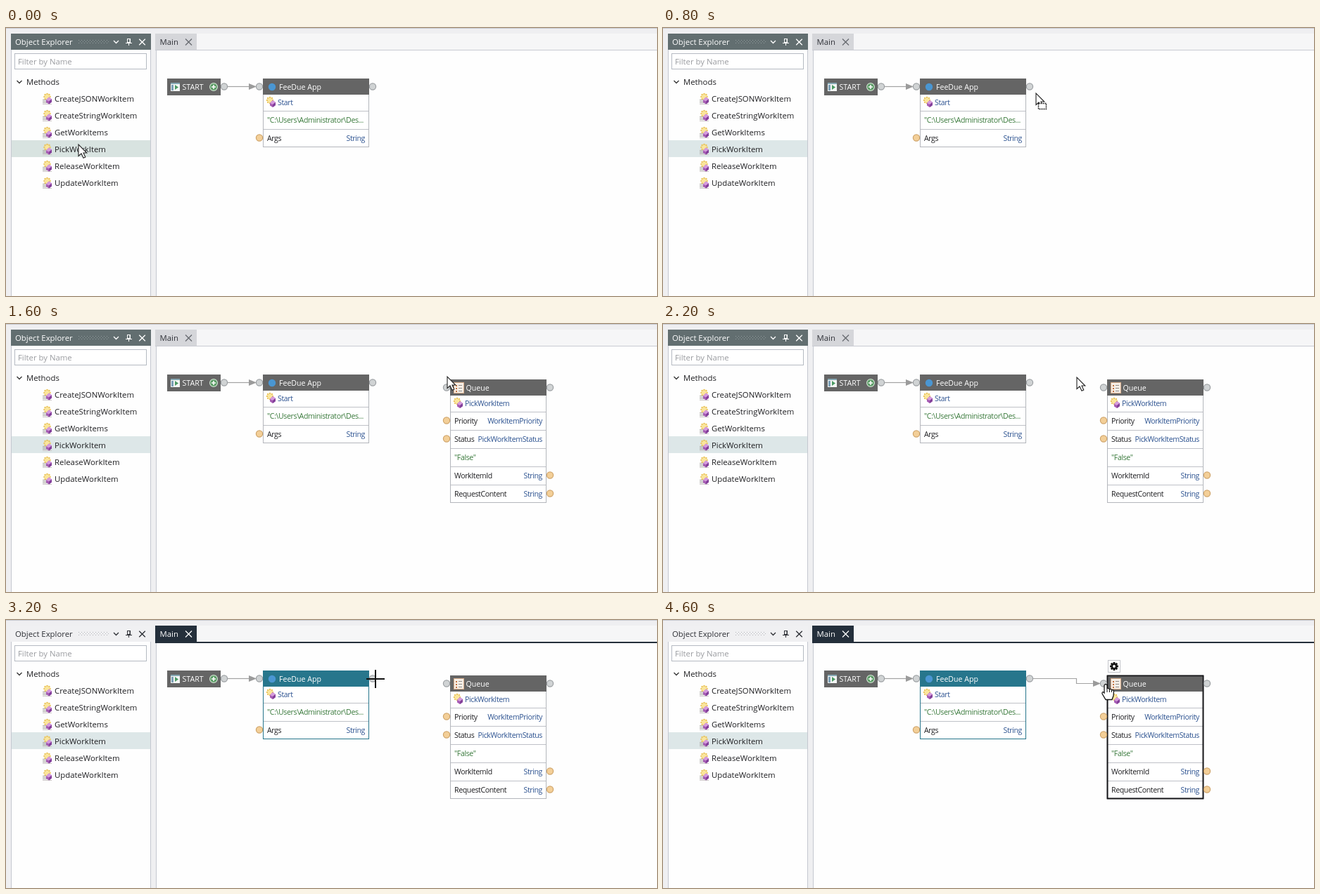
An HTML page with a canvas that plays this animation: 925 by 382 pixels, repeating every 4.8 s.

```html
<!DOCTYPE html>
<html lang="en">
<head>
<meta charset="utf-8">
<title>Workflow designer</title>
<style>
html, body { margin: 0; width: 100%; height: 100%; overflow: hidden; background: #efeff1; }
canvas { display: block; }
</style>
</head>
<body>
<canvas id="stage" width="925" height="382"></canvas>
<script>
const ctx = document.getElementById('stage').getContext('2d');
const LOOP = 4800, STEP = 200;
const FONT = '"Open Sans", "Noto Sans", sans-serif';
const BLUE = '#2c5290', GREEN = '#3a7a3c', INK = '#1f1f22', GREY = '#656565', TEAL = '#27768c';
const METHODS = ['CreateJSONWorkItem', 'CreateStringWorkItem', 'GetWorkItems',
  'PickWorkItem', 'ReleaseWorkItem', 'UpdateWorkItem'];

// Pointer path: time, x, y, shape
const POINTER = [
  [0, 103, 166, 'arrow'], [200, 128, 165, 'drag'], [400, 262, 148, 'drag'],
  [600, 415, 124, 'drag'], [800, 530, 93, 'drag'], [1000, 581, 86, 'drag'],
  [1200, 626, 76, 'drag'], [1400, 627, 75, 'arrow'], [2200, 588, 76, 'arrow'],
  [2600, 550, 77, 'arrow'], [2800, 525, 79, 'arrow'], [3000, 521, 80, 'hand'],
  [3200, 525, 84, 'cross'], [3400, 545, 86, 'cross'], [3600, 583, 90, 'cross'],
  [3800, 610, 90.5, 'cross'], [4000, 627, 91, 'cross'], [4200, 635, 92, 'cross'],
  [4400, 629, 91, 'hand']
];
const pointerAt = t => POINTER.filter(p => p[0] <= t).pop();

function rect(x, y, w, h, fill, stroke, lw = 1) {
  if (fill) { ctx.fillStyle = fill; ctx.fillRect(x, y, w, h); }
  if (stroke) {
    ctx.strokeStyle = stroke;
    ctx.lineWidth = lw;
    ctx.strokeRect(x + .5, y + .5, w - 1, h - 1);
  }
}

function path(pts, stroke, lw = 1, fill) {
  ctx.beginPath();
  pts.forEach(([x, y], i) => i ? ctx.lineTo(x, y) : ctx.moveTo(x, y));
  if (fill) { ctx.closePath(); ctx.fillStyle = fill; ctx.fill(); }
  if (stroke) { ctx.strokeStyle = stroke; ctx.lineWidth = lw; ctx.stroke(); }
}

function disc(x, y, r, fill, stroke, lw = 1) {
  ctx.beginPath();
  ctx.arc(x, y, r, 0, Math.PI * 2);
  ctx.fillStyle = fill;
  ctx.fill();
  if (stroke) { ctx.strokeStyle = stroke; ctx.lineWidth = lw; ctx.stroke(); }
}

function text(s, x, y, color = INK, size = 11.35, align = 'left', spacing = 0) {
  ctx.font = size + 'px ' + FONT;
  ctx.letterSpacing = spacing + 'px';
  ctx.textAlign = align;
  ctx.fillStyle = color;
  ctx.fillText(s, x, y);
}
const cell = (s, x, y, color, align) => text(s, x, y, color, 10.6, align, -.4);

function at(x, y, draw) {
  ctx.save();
  ctx.translate(x, y);
  draw();
  ctx.restore();
}

const port = (x, y) => disc(x, y, 4.6, '#d0d3d4', '#9b9fa2', 1.2);
const dataPort = (x, y) => disc(x, y, 4.6, '#f3cf98', '#cfa469', 1.2);

function cross(x, y, r, color, lw) {
  path([[x - r, y - r], [x + r, y + r]], color, lw);
  path([[x - r, y + r], [x + r, y - r]], color, lw);
}

function burst(x, y) {
  for (let i = 0; i < 8; i++) {
    const a = i * Math.PI / 4;
    disc(x + 4 * Math.cos(a), y + 4 * Math.sin(a), 1.3, '#ecc65c');
  }
  disc(x, y, 3, '#fbe69a');
}

function cube(x, y) {
  path([[x, y + 4], [x + 4, y], [x + 8, y + 3], [x + 8, y + 7], [x + 4, y + 10], [x, y + 7.5]],
    null, 1, '#a65cb4');
  path([[x, y + 4], [x + 4, y], [x + 8, y + 3], [x + 4, y + 6]], null, 1, '#d59bdc');
  path([[x + 4, y + 6], [x + 8, y + 3], [x + 8, y + 7], [x + 4, y + 10]], null, 1, '#83409a');
}

function treeIcon(x, y) {
  for (let i = 0; i < 3; i++) rect(x + 1, y + 9 + i * 2, 6, 1, '#a9a7a3');
  rect(x + 1, y + 15, 13, 1, '#c9c3c4');
  burst(x + 7.5, y + 5);
  cube(x + 6, y + 5.5);
}

function callIcon(x, y) {
  burst(x + 5, y + 5);
  cube(x + 5, y + 5);
}

function panel(t) {
  const active = t < 3200, ink = active ? '#fff' : '#2e3036';
  rect(7, 8, 199, 380, '#fefefe', '#c5c8d0');
  rect(7, 8, 199, 23, active ? '#626e70' : '#f0f0f2');
  text('Object Explorer', 13, 24, ink);
  ctx.fillStyle = active ? '#909a9b' : '#b3b5ba';
  for (let row = 0; row < 3; row++)
    for (let x = 103 + row % 2 * 2; x < 146; x += 4) ctx.fillRect(x, 17 + row * 2, 1, 1);
  path([[153, 18], [156.5, 21.5], [160, 18]], ink, 1.3);
  rect(172, 15, 5, 6, null, ink);
  path([[170, 21.5], [179, 21.5]], ink);
  path([[174.5, 21], [174.5, 25]], ink);
  path([[176, 15], [176, 21]], ink);
  cross(193.5, 20, 4.3, ink, 1.3);

  rect(12, 36, 188, 23, '#fff', '#b5bac2');
  text('Filter by Name', 17, 52, '#9a9ca0');
  path([[15.5, 75], [19, 78.5], [22.5, 75]], '#333', 1.3);
  text('Methods', 29, 81);
  rect(8, 160, 197, 24, t ? '#dde7e8' : '#d8e3e0');
  METHODS.forEach((name, i) => {
    treeIcon(51, 93 + i * 24);
    text(name, 69, 105 + i * 24);
  });
}

function workspace(t) {
  const active = t >= 3200, dark = '#242f3b';
  rect(213, 8, 712, 23, '#f6f6f7');
  rect(213, 31, 713, 360, '#fefefe');
  rect(213, 31, 1, 351, '#c5c8d0');
  rect(212, 8, 59, 24, active ? dark : '#d5d6da');
  rect(212, 31, 713, active ? 2 : 1, active ? dark : '#c9cbd2');
  text('Main', 218.5, 24, active ? '#fff' : '#303238');
  cross(259.5, 20, 4.5, active ? '#fff' : '#66696e', 1.2);
}

function arrow(x, y) {
  path([[x, y], [x - 11, y - 4.5], [x - 11, y + 4.5]], null, 1, '#9b9b9b');
}

function startNode() {
  path([[315, 83.5], [346, 83.5]], '#a2a2a2', 1.2);
  arrow(356, 83.5);
  rect(229, 72, 76, 24, GREY);
  rect(234, 78, 13, 12, '#f4f6f5');
  rect(234, 78, 13, 2, '#86a8b4');
  rect(235, 81, 3, 8, '#7b9fb6');
  path([[240, 81], [245, 84.5], [240, 88]], null, 1, '#4b9a63');
  text('START', 250.5, 88, '#fff', 10.6);
  disc(295, 84, 5.4, '#5c9c67', '#cfe3d0', 1.2);
  path([[292, 84], [298, 84]], '#fff', 1.5);
  path([[295, 81], [295, 87]], '#fff', 1.5);
  port(310, 83.5);
}

// Title bar, one short row, then full rows
function node(x, y, w, rows, head, edge, lw) {
  const h = 46 + rows * 26;
  rect(x, y, w, h, '#fff');
  for (let i = 0; i < rows; i++) rect(x, y + 46 + i * 26, w, 1, '#bfc1c7');
  rect(x, y, w, h, null, edge, lw);
  rect(x, y, w, 23, head);
  if (lw > 1) rect(x, y, w, h, null, edge, lw);
}

function appNode(t) {
  const picked = t >= 3200, hover = t === 3000;
  node(365, 72, 151, 2, picked ? TEAL : GREY,
    picked ? TEAL : hover ? '#111' : '#b4b6bc', hover ? 1.6 : 1);
  disc(378, 84, 5.2, '#4a96d2');
  text('FeeDue App', 388, 88, '#fff', 10.6);
  callIcon(370, 98);
  cell('Start', 386, 110, BLUE);
  cell('"C:\\Users\\Administrator\\Des...', 371, 135, GREEN);
  cell('Args', 371, 161);
  cell('String', 510, 161, BLUE, 'right');
  port(360, 83.5);
  port(521, 83.5);
  dataPort(360, 156.5);
}

function gear(x, y) {
  rect(x - 9, y - 9, 18, 18, '#fff', '#c3c5ca');
  at(x, y, () => {
    for (let i = 0; i < 8; i++) {
      ctx.rotate(Math.PI / 4);
      rect(-1.4, -6, 2.8, 4, '#151515');
    }
    disc(0, 0, 4.4, '#151515');
    disc(0, 0, 1.9, '#fff');
  });
}

function queueNode(t) {
  const hover = t >= 4600;
  node(631, 79, 137, 5, GREY, hover ? '#151518' : '#b4b6bc', hover ? 1.6 : 1);
  rect(636, 83, 15, 16, '#f6eee6', '#d5ac8b');
  for (let y = 87; y < 97; y += 4) {
    rect(639, y, 2, 2, '#c1713f');
    rect(643, y, 5, 1, '#8f8c89');
  }
  text('Queue', 653.5, 95, '#fff', 10.6);
  callIcon(636, 105);
  cell('PickWorkItem', 652, 117, BLUE);
  const rows = [['Priority', 'WorkItemPriority', 142], ['Status', 'PickWorkItemStatus', 168],
    ['WorkItemId', 'String', 220], ['RequestContent', 'String', 246]];
  rows.forEach(([name, type, y], i) => {
    cell(name, 637, y);
    cell(type, 762, y, BLUE, 'right');
    dataPort(i < 2 ? 626 : 773, y - 4.5);
  });
  cell('"False"', 637, 194, GREEN);
  port(626, 90.5);
  port(773, 90.5);
  if (hover) gear(641, 66);
}

function link(t) {
  if (t >= 4400) {
    path([[526, 83.5], [587.5, 83.5], [587.5, 90.5], [613, 90.5]], '#a2a2a2', 1.2);
    arrow(622, 90.5);
  } else if (t >= 3600) {
    // The rubber band trails the pointer by one step
    const [, x, y] = pointerAt(t - STEP);
    const mid = (530 + x) / 2;
    path([[530, 83.5], [mid, 83.5], [mid, y], [x, y]], '#a2a2a2', 1.2);
  }
}

const shapes = {
  arrow() {
    path([[0, 0], [0, 16.5], [4, 13], [7, 19.2], [9.8, 18], [7, 12], [11.8, 12], [0, 0]],
      '#222', 1.1, '#fff');
  },
  drag() {
    shapes.arrow();
    rect(3, 14, 12, 9, '#fff');
    ctx.setLineDash([2, 1]);
    rect(3, 14, 12, 9, null, '#222', 1.5);
    ctx.setLineDash([]);
  },
  hand() {
    ctx.beginPath();
    ctx.moveTo(-2, 12);
    ctx.lineTo(-2, 2);
    ctx.quadraticCurveTo(0, -1, 2, 2);
    ctx.lineTo(2, 7);
    ctx.quadraticCurveTo(4, 5.5, 5.5, 8);
    ctx.quadraticCurveTo(7.5, 6.5, 8.5, 9);
    ctx.quadraticCurveTo(11.5, 8, 11.5, 11);
    ctx.lineTo(11, 17);
    ctx.lineTo(9, 22.5);
    ctx.lineTo(0, 22.5);
    ctx.lineTo(-5, 14);
    ctx.quadraticCurveTo(-5.5, 10, -2, 13);
    ctx.closePath();
    ctx.fillStyle = '#fff';
    ctx.fill();
    ctx.strokeStyle = '#151515';
    ctx.lineWidth = 1.3;
    ctx.stroke();
    for (const x of [2, 5.5, 8.5]) path([[x, 8], [x, 12]], '#151515');
  },
  cross() {
    path([[-13, 0], [13, 0]], '#111', 2);
    path([[0, -13], [0, 13]], '#111', 2);
  }
};

function draw(t) {
  rect(0, 0, 925, 382, '#efeff1');
  rect(0, 0, 925, 1, '#c9cbd3');
  panel(t);
  workspace(t);
  startNode();
  appNode(t);
  link(t);
  if (t >= 1600) queueNode(t);
  const [, x, y, shape] = pointerAt(t);
  at(x, y, shapes[shape]);
}

const begin = performance.now();
function tick() {
  const t = (performance.now() - begin) % LOOP;
  draw(Math.floor(t / STEP) * STEP);
  requestAnimationFrame(tick);
}
tick();
</script>
</body>
</html>
```
